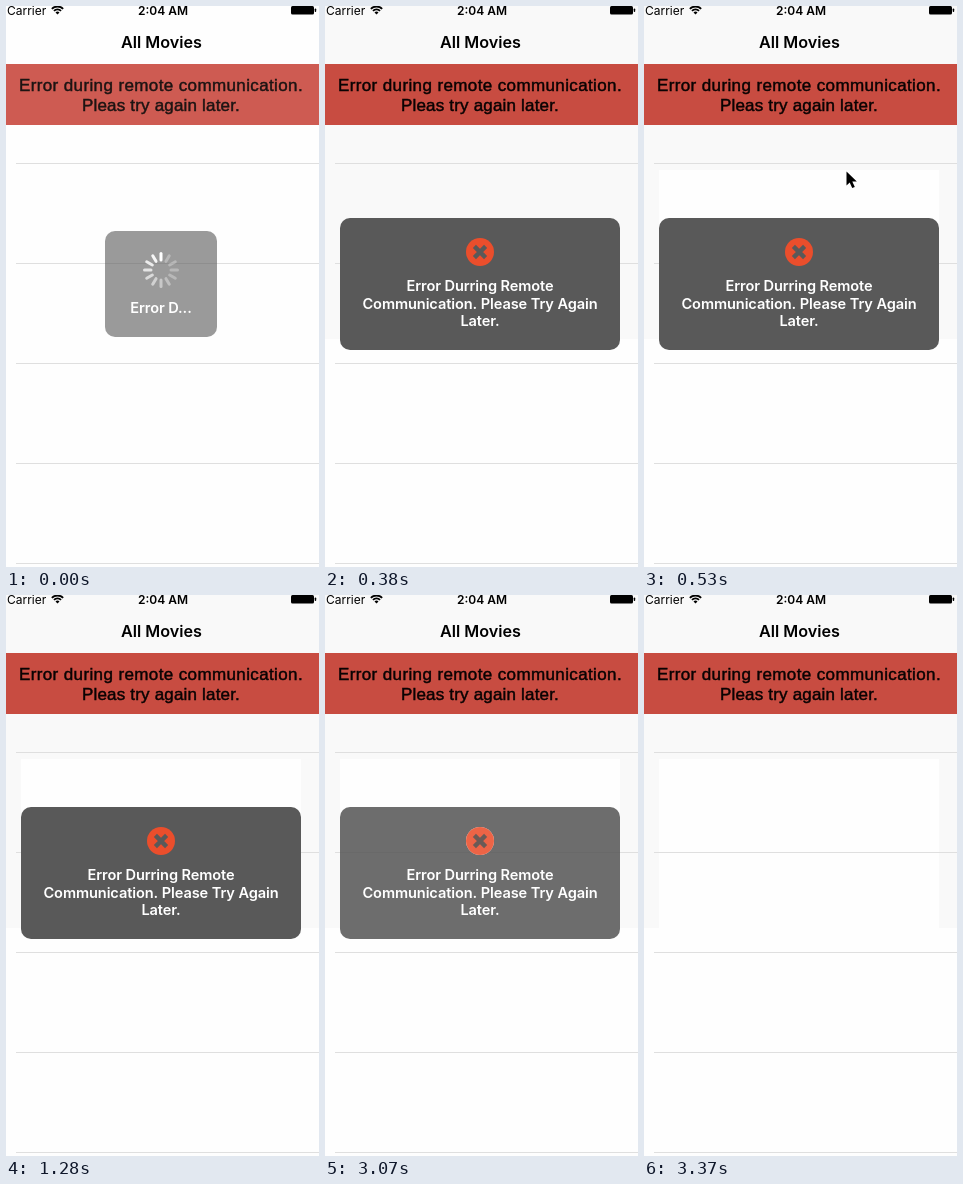
Animation of 313 by 561 pixels, one loop 4420 ms. Source, as an HTML page with a canvas:

```html
<!DOCTYPE html>
<html lang="en">
<head>
<meta charset="utf-8">
<title>Error message</title>
<style>
html, body { margin: 0; width: 100%; height: 100%; overflow: hidden; background: #fefefe; }
canvas { display: block; width: 313px; height: 561px; }
</style>
</head>
<body>
<canvas id="stage"></canvas>
<script>
const W = 313, H = 561, LOOP = 4420;
const SANS = 'Inter, sans-serif';
const HELV = '"Liberation Sans", Arial, sans-serif';
const DARK = '#595959', ORANGE = '#ea4e2c';

const canvas = document.getElementById('stage');
const ctx = canvas.getContext('2d');
const ratio = window.devicePixelRatio || 1;
canvas.width = W * ratio;
canvas.height = H * ratio;
ctx.scale(ratio, ratio);

// Pointer tip: [from, until, x, y]
const pointerStops = [
  [530, 680, 202, 165],
  [680, 980, 202, 179],
  [980, 1130, 228, 264],
  [1130, 1280, 272, 503],
];

function rect(x, y, w, h, color) {
  ctx.fillStyle = color;
  ctx.fillRect(x, y, w, h);
}

function roundRect(x, y, w, h, r, color) {
  ctx.beginPath();
  ctx.roundRect(x, y, w, h, r);
  ctx.fillStyle = color;
  ctx.fill();
}

function text(str, x, y, font, color, { align = 'center', spacing = 0, bold = 0 } = {}) {
  ctx.font = font;
  ctx.textAlign = align;
  ctx.letterSpacing = spacing + 'px';
  ctx.fillStyle = ctx.strokeStyle = color;
  ctx.fillText(str, x, y);
  if (bold) {
    ctx.lineWidth = bold;
    ctx.strokeText(str, x, y);
  }
}

function label(str, x, y, align) {
  text(str, x, y, `600 14.6px ${SANS}`, '#fff', { align, spacing: -0.1 });
}

function statusBar() {
  text('Carrier', 1, 8.5, `400 12px ${SANS}`, '#000', { align: 'left' });
  text('2:04 AM', 157, 8.5, `600 12px ${SANS}`, '#000');
  ctx.strokeStyle = '#000';
  ctx.lineWidth = 1.8;
  for (const r of [5, 8]) {
    ctx.beginPath();
    ctx.arc(51.5, 8.5, r, -Math.PI * 0.75, -Math.PI * 0.25);
    ctx.stroke();
  }
  ctx.beginPath();
  ctx.moveTo(51.5, 8.5);
  ctx.arc(51.5, 8.5, 2.8, -Math.PI * 0.75, -Math.PI * 0.25);
  ctx.fillStyle = '#000';
  ctx.fill();
  roundRect(285, 0, 23, 8.5, 1.5, '#000');
  roundRect(308.7, 2.5, 1.5, 3.5, 0.7, '#000');
}

function screen(t) {
  const early = t < 260;
  rect(0, 0, W, H, '#fefefe');
  if (!early) rect(0, 0, W, 333, '#f9f9f9');
  if (t >= 530) rect(15, 164, 280, 169, '#fefefe');
  for (let y = 157; y < H; y += 100) rect(10, y, W - 10, 1, '#dfdfdf');

  statusBar();
  text('All Movies', 155.5, 42, `600 16.2px ${SANS}`, '#000');

  const ink = early ? '#1d1413' : '#0a0303';
  rect(0, 58, W, 61, early ? '#ce5b52' : '#c84c41');
  text('Error during remote communication.', 155, 85, `17px ${HELV}`, ink, { spacing: 0.38, bold: 0.45 });
  text('Pleas try again later.', 155, 105, `17px ${HELV}`, ink, { spacing: 0.18, bold: 0.45 });
}

function spinner(x, y) {
  ctx.lineCap = 'round';
  ctx.lineWidth = 3;
  for (let i = 0; i < 12; i++) {
    const a = -Math.PI / 2 - i * Math.PI / 6;
    ctx.strokeStyle = `rgba(255,255,255,${Math.max(0.3, 1 - i * 0.09)})`;
    ctx.beginPath();
    ctx.moveTo(x + 10 * Math.cos(a), y + 10 * Math.sin(a));
    ctx.lineTo(x + 16.5 * Math.cos(a), y + 16.5 * Math.sin(a));
    ctx.stroke();
  }
  ctx.lineCap = 'butt';
}

function errorIcon(x, y) {
  ctx.beginPath();
  ctx.arc(x, y, 14, 0, Math.PI * 2);
  ctx.fillStyle = ORANGE;
  ctx.fill();
  ctx.strokeStyle = DARK;
  ctx.lineWidth = 4.4;
  ctx.beginPath();
  for (const s of [-1, 1]) {
    ctx.moveTo(x - 5.6, y - 5.6 * s);
    ctx.lineTo(x + 5.6, y + 5.6 * s);
  }
  ctx.stroke();
}

function loadingBox() {
  roundRect(99, 225, 112, 106, 10, 'rgba(89,89,89,0.6)');
  spinner(155, 264);
  label('Error D...', 155, 307);
}

function growingBox() {
  ctx.save();
  roundRect(85, 223, 140, 110, 9, DARK);
  ctx.clip();
  errorIcon(225, 257);
  ctx.beginPath();
  ctx.rect(100, 285, 105, 30);
  ctx.clip();
  label('Communication.', 105.5, 306, 'left');
  ctx.restore();
}

// The box fades as one layer, but its lettering stays white.
function messageBox(alpha) {
  ctx.globalAlpha = alpha;
  roundRect(15, 212, 280, 132, 10, DARK);
  ctx.globalAlpha = 1;
  if (alpha < 1) {
    ctx.beginPath();
    ctx.arc(155, 246, 14, 0, Math.PI * 2);
    ctx.fillStyle = '#fefefe';
    ctx.fill();
  }
  ctx.globalAlpha = alpha;
  errorIcon(155, 246);
  ctx.globalAlpha = 1;
  label('Error Durring Remote', 155, 284.5);
  label('Communication. Please Try Again', 155, 302.5);
  label('Later.', 155, 320);
}

function pointer(x, y) {
  ctx.save();
  ctx.translate(x, y);
  const arrow = new Path2D('M.5 .5V14.5L3.7 11.5L6.2 17L8.8 16L6.3 10.6H10.8Z');
  ctx.lineJoin = 'round';
  ctx.lineWidth = 1.8;
  ctx.strokeStyle = '#fff';
  ctx.stroke(arrow);
  ctx.fillStyle = '#000';
  ctx.fill(arrow);
  ctx.restore();
}

function draw(now) {
  const t = now % LOOP;
  screen(t);
  if (t < 260) loadingBox();
  else if (t < 380) growingBox();
  else if (t < 3070) messageBox(1);
  else if (t < 3220) messageBox(0.88);
  else if (t < 3370) messageBox(0.36);

  const stop = pointerStops.find(([from, until]) => t >= from && t < until);
  if (stop) pointer(stop[2], stop[3]);
}

const start = performance.now();
function tick() {
  draw(performance.now() - start);
  requestAnimationFrame(tick);
}
tick();
</script>
</body>
</html>
```
